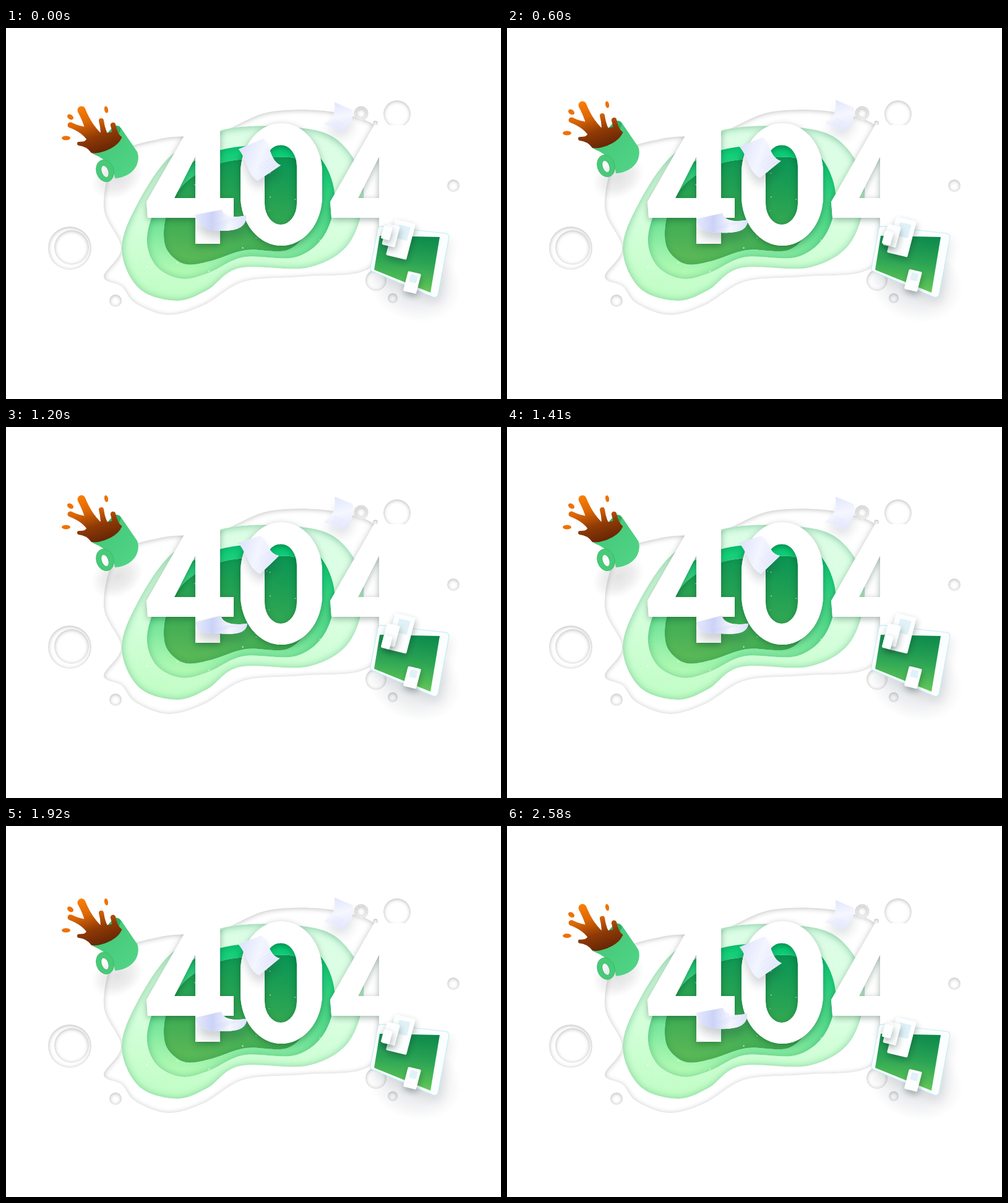
An HTML page with a canvas for the animation above (2610 ms loop, 800x600 px).

```html
<!DOCTYPE html>
<html lang="en">
<head>
<meta charset="utf-8">
<title>404</title>
<style>
html, body { margin: 0; width: 100%; height: 100%; overflow: hidden; background: #fff; }
canvas { display: block; width: 800px; height: 600px; }
</style>
</head>
<body>
<canvas id="stage" width="800" height="600"></canvas>
<script>
const LOOP = 2610;
const W = 800, H = 600;
const stage = document.getElementById('stage').getContext('2d');

const mix = (a, b, p) => a.map((v, i) => v + (b[i] - v) * p);

function seeded(seed) {
  return () => (seed = (seed * 16807) % 2147483647) / 2147483647;
}

// Closed Catmull-Rom curve through flat x,y pairs
function blob(pts) {
  const n = pts.length / 2, path = new Path2D();
  const at = i => { const k = (i + n) % n; return [pts[2 * k], pts[2 * k + 1]]; };
  path.moveTo(pts[0], pts[1]);
  for (let i = 0; i < n; i++) {
    const [ax, ay] = at(i - 1), [bx, by] = at(i), [cx, cy] = at(i + 1), [dx, dy] = at(i + 2);
    path.bezierCurveTo(bx + (cx - ax) / 6, by + (cy - ay) / 6, cx - (dx - bx) / 6, cy - (dy - by) / 6, cx, cy);
  }
  path.closePath();
  return path;
}

function ellipse(x, y, rx, ry = rx, angle = 0) {
  const path = new Path2D();
  path.ellipse(x, y, rx, ry, angle, 0, Math.PI * 2);
  return path;
}

// Polygon with rounded corners
function roundPoly(q, r) {
  const path = new Path2D(), n = q.length / 2;
  path.moveTo((q[0] + q[2]) / 2, (q[1] + q[3]) / 2);
  for (let i = 1; i <= n; i++) {
    const a = (i % n) * 2, b = ((i + 1) % n) * 2;
    path.arcTo(q[a], q[a + 1], (q[a] + q[b]) / 2, (q[a + 1] + q[b + 1]) / 2, r);
  }
  path.closePath();
  return path;
}

function gradient(c, x0, y0, x1, y1, ...colors) {
  const g = c.createLinearGradient(x0, y0, x1, y1);
  colors.forEach((col, i) => g.addColorStop(i / (colors.length - 1), col));
  return g;
}

function shadowed(c, path, fill, color, blur, dx, dy, rule = 'nonzero') {
  c.save();
  c.shadowColor = color;
  c.shadowBlur = blur;
  c.shadowOffsetX = dx;
  c.shadowOffsetY = dy;
  c.fillStyle = fill;
  c.fill(path, rule);
  c.restore();
}

// Hollow cut into paper: fill plus a shadow cast inwards from its rim
function cutout(c, path, fill, color, blur) {
  c.save();
  c.fillStyle = fill;
  c.fill(path);
  c.clip(path);
  const around = new Path2D();
  around.rect(-100, -100, W + 200, H + 200);
  around.addPath(path);
  shadowed(c, around, '#fff', color, blur, 0, 1, 'evenodd');
  c.restore();
}

function softEllipse(c, x, y, rx, ry, angle, rgb, alpha) {
  c.save();
  c.translate(x, y);
  c.rotate(angle);
  c.scale(rx, ry);
  const g = c.createRadialGradient(0, 0, 0, 0, 0, 1);
  g.addColorStop(0, `rgba(${rgb},${alpha})`);
  g.addColorStop(0.55, `rgba(${rgb},${alpha * 0.6})`);
  g.addColorStop(1, `rgba(${rgb},0)`);
  c.fillStyle = g;
  c.fillRect(-1, -1, 2, 2);
  c.restore();
}

const plate = blob([158,290, 180,207, 250,179, 340,170, 430,135, 545,139, 612,180, 622,320, 585,390, 480,402,
  385,410, 320,448, 262,464, 209,445, 187,418, 158,402, 186,356]);

// The hollow's widest and deepest rims; any rim between them is a blend
const wideRim = [187,358, 212,285, 268,205, 345,166, 440,159, 530,177, 577,250, 558,343, 490,387, 378,388,
  325,424, 275,441, 215,421];
const deepRim = [255,335, 262,295, 290,250, 345,219, 420,210, 475,215, 499,268, 490,322, 455,359, 388,359,
  330,377, 290,382, 263,363];

const rims = [
  { depth: 0, colors: ['#dcfde6', '#d9ffe0', '#c2fdc6'] },
  { depth: 0.6, colors: ['#05cb74', '#52d98a', '#b0f9b3'] },
  { depth: 1, colors: ['#0b9653', '#2ea653', '#59b756'] }
];

// x, y, radius
const bubbles = [[103, 356, 35], [106, 355, 28], [177, 441, 10], [574, 138, 11.5], [574, 138, 8.5], [597, 154, 4],
  [632, 139, 22], [723, 255, 10], [598, 408, 17], [625, 437, 8]];

function digits() {
  const path = new Path2D();
  for (const x of [227, 524]) {
    path.addPath(new Path2D(`M${x + 71} 157h48v118h22v32h-22v42h-40v-42H${x + 2}L${x} 281Z
      M${x + 79} 208l-34 67h34Z`));
  }
  path.roundRect(379, 154, 132, 198, { x: 66, y: 80 });
  path.roundRect(418, 189, 52, 129, { x: 26, y: 34 });
  return path;
}

function paintStars(c, area) {
  const random = seeded(404);
  c.save();
  c.clip(area);
  c.fillStyle = 'rgba(255,255,255,.75)';
  for (let i = 0; i < 34; i++) {
    c.fill(ellipse(205 + random() * 340, 195 + random() * 245, 0.6 + random() * 0.6));
  }
  c.restore();
}

function paintTablet(c) {
  softEllipse(c, 660, 412, 78, 62, 0.35, '60,70,90', 0.15);
  const body = roundPoly([602,320, 717,333, 697,438, 588,392], 6);
  shadowed(c, body, '#fbfeff', 'rgba(40,50,70,.1)', 16, 4, 9);
  c.strokeStyle = '#c4edf3';
  c.lineWidth = 1.2;
  c.stroke(body);
  c.fillStyle = gradient(c, 650, 335, 640, 420, '#0d8a4c', '#2ba454', '#5fc657');
  c.fill(roundPoly([604,336, 701,338, 686,428, 595,391], 0.5));
}

function paintBackdrop(c) {
  c.fillStyle = '#fff';
  c.fillRect(0, 0, W, H);
  cutout(c, plate, '#fff', 'rgba(0,0,0,.26)', 9);
  for (const [x, y, r] of bubbles) cutout(c, ellipse(x, y, r), '#fff', 'rgba(0,0,0,.3)', Math.min(6, r));

  for (const { depth, colors } of rims) {
    const [top, bottom] = mix([160, 441], [208, 382], depth);
    const path = blob(mix(wideRim, deepRim, depth));
    cutout(c, path, gradient(c, 400, top, 370, bottom, ...colors), 'rgba(0,130,60,.42)', 13);
  }
  paintStars(c, blob(wideRim));

  const text = digits();
  c.save();
  c.clip(plate);
  shadowed(c, text, '#fff', 'rgba(0,50,25,.36)', 11, 0, 3, 'evenodd');
  c.restore();
  c.fillStyle = '#fff';
  c.fill(text, 'evenodd');

  softEllipse(c, 180, 242, 44, 32, -0.5, '60,60,70', 0.15);
  paintTablet(c);
}

const backdrop = document.createElement('canvas');
backdrop.width = W;
backdrop.height = H;
paintBackdrop(backdrop.getContext('2d'));

// Liquid tongue, flaring from a round tip down to a wide root
function tongue(tipX, tipY, r, rootX, rootY, spread) {
  const path = new Path2D();
  const angle = Math.atan2(tipY - rootY, tipX - rootX);
  const nx = -Math.sin(angle), ny = Math.cos(angle);
  const [waistX, waistY] = mix([tipX, tipY], [rootX, rootY], 0.6);
  path.moveTo(rootX + nx * spread, rootY + ny * spread);
  path.quadraticCurveTo(waistX + nx * r * 0.7, waistY + ny * r * 0.7, tipX + nx * r, tipY + ny * r);
  path.arc(tipX, tipY, r, angle + Math.PI / 2, angle - Math.PI / 2, true);
  path.quadraticCurveTo(waistX - nx * r * 0.7, waistY - ny * r * 0.7, rootX - nx * spread, rootY - ny * spread);
  path.closePath();
  return path;
}

const mugInside = new Path2D('M136 200L174 159Q182 155 187 164L181 190L150 207Z');
const mugBody = new Path2D('M137 202C150 206 178 192 186 162L212 200Q215 207 213 216C210 231 195 242 176 243Q173 221 150 208Z');
const mugHandle = ellipse(160, 231, 14, 18, -0.3);
mugHandle.addPath(ellipse(160, 232, 5.5, 10, -0.35));
const coffee = [
  new Path2D('M117 187C132 184 133 174 140 168C152 174 160 170 172 168Q180 170 187 176C184 192 152 205 138 202Q130 191 117 190Z'),
  tongue(122, 133, 6.5, 145, 182, 16),
  tongue(104, 157, 4.5, 139, 172, 14),
  tongue(154, 150, 4, 160, 180, 9),
  tongue(173, 157, 4.2, 179, 180, 9),
  tongue(118, 187, 3, 142, 186, 9)
];
const drops = [ellipse(97, 178, 7, 3.5), ellipse(104, 144, 5.5, 3.8, 0.6), ellipse(162, 132, 3, 5.5, -0.2)];

function paintMug(c, p) {
  c.save();
  c.translate(0, -17.5 * p);
  c.fillStyle = '#2fae63';
  c.fill(mugInside);
  c.fillStyle = gradient(c, 150, 190, 205, 240, '#45c979', '#51d486');
  c.fill(mugBody);
  c.fillStyle = '#48ca78';
  c.fill(mugHandle, 'evenodd');
  c.strokeStyle = '#36b567';
  c.lineWidth = 0.8;
  c.stroke(mugHandle);
  c.fillStyle = gradient(c, 122, 127, 146, 203, '#f97f04', '#dc6605', '#8f3a06', '#672605');
  coffee.forEach(part => c.fill(part));
  c.fillStyle = '#ee7206';
  drops.forEach(drop => c.fill(drop));
  c.restore();
}

// Corners run clockwise from top left; both long sides share one bow,
// and the last edge bulges by lip
const sheets = [
  { from: [531,120, 560,133, 541,168, 514,155], to: [531,112, 560,124, 544,166, 514,153],
    bow: [8, 3, 10, 4], lip: [0, 0], tint: ['#e0e5fc', '#f5f7ff', '#e3e7fb'], shade: 0.12 },
  { from: [376,196, 416,179, 444,222, 407,247], to: [375,187, 410,176, 441,207, 411,237],
    bow: [3, -2, -8, 7], lip: [0, 0], tint: ['#dde2fb', '#f3f5ff', '#e3e7fb'], shade: 0.2 },
  { from: [306,302, 349,294, 388,303, 345,328], to: [306,317, 347,306, 390,319, 340,334],
    bow: [-11, 8, -9, 8], lip: [24, 14], tint: ['#e6eafe', '#cbd2f6', '#f5f7ff', '#dde2fb'], shade: 0.22 }
];

function paintSheet(c, { from, to, bow, lip, tint, shade }, p) {
  const [ax, ay, bx, by, dx, dy, ex, ey] = mix(from, to, p);
  const side = (x0, y0, x1, y1) => [
    x0 + (x1 - x0) / 3 + bow[0], y0 + (y1 - y0) / 3 + bow[1],
    x0 + (x1 - x0) / 1.5 + bow[2], y0 + (y1 - y0) / 1.5 + bow[3]
  ];
  const left = side(ax, ay, ex, ey), right = side(bx, by, dx, dy);
  const path = new Path2D();
  path.moveTo(ax, ay);
  path.lineTo(bx, by);
  path.bezierCurveTo(...right, dx, dy);
  path.quadraticCurveTo((dx + ex) / 2 + lip[0], (dy + ey) / 2 + lip[1], ex, ey);
  path.bezierCurveTo(left[2], left[3], left[0], left[1], ax, ay);
  path.closePath();
  shadowed(c, path, '#eceffd', `rgba(25,40,55,${shade})`, 16, 1, 12);
  c.fillStyle = gradient(c, ax, ay, dx, dy, ...tint);
  c.fill(path);

  // Faint lines of writing across the lower half
  c.strokeStyle = 'rgba(195,203,242,.3)';
  c.lineWidth = 1;
  c.beginPath();
  for (let t = 0.5; t < 0.9; t += 0.12) {
    const l = mix([left[0], left[1]], [ex, ey], t), r = mix([right[0], right[1]], [dx, dy], t);
    c.moveTo(...mix(l, r, 0.25));
    c.lineTo(...mix(l, r, 0.8));
  }
  c.stroke();
}

const cards = [
  { x: 629, y: 309, w: 33, h: 58, drift: -9, panel: true },
  { x: 616, y: 316, w: 21, h: 34, drift: 1 },
  { x: 611, y: 319, w: 14, h: 21, drift: 18 },
  { x: 650, y: 393, w: 21, h: 32, drift: -7, panel: true }
];

function paintCard(c, { x, y, w, h, drift, panel }, p) {
  const at = (u, v) => [x + u * w - v * h * 0.26, y + drift * p + u * w * 0.24 + v * h];
  const quad = (l, t, r, b) => [...at(l, t), ...at(r, t), ...at(r, b), ...at(l, b)];
  shadowed(c, roundPoly(quad(0, 0, 1, 1), 2), '#fdfeff', 'rgba(10,40,35,.32)', 11, 1, 5);
  if (!panel) return;
  c.fillStyle = '#e0f2f8';
  c.fill(roundPoly(quad(0.25, 0.12, 0.8, 0.5), 1));
}

function render(now) {
  const p = 1 - Math.abs(1 - 2 * (now % LOOP) / LOOP);
  stage.drawImage(backdrop, 0, 0);
  paintMug(stage, p);
  sheets.forEach(sheet => paintSheet(stage, sheet, p));
  cards.forEach(card => paintCard(stage, card, p));
  requestAnimationFrame(() => render(performance.now() - start));
}

const start = performance.now();
render(0);
</script>
</body>
</html>
```
